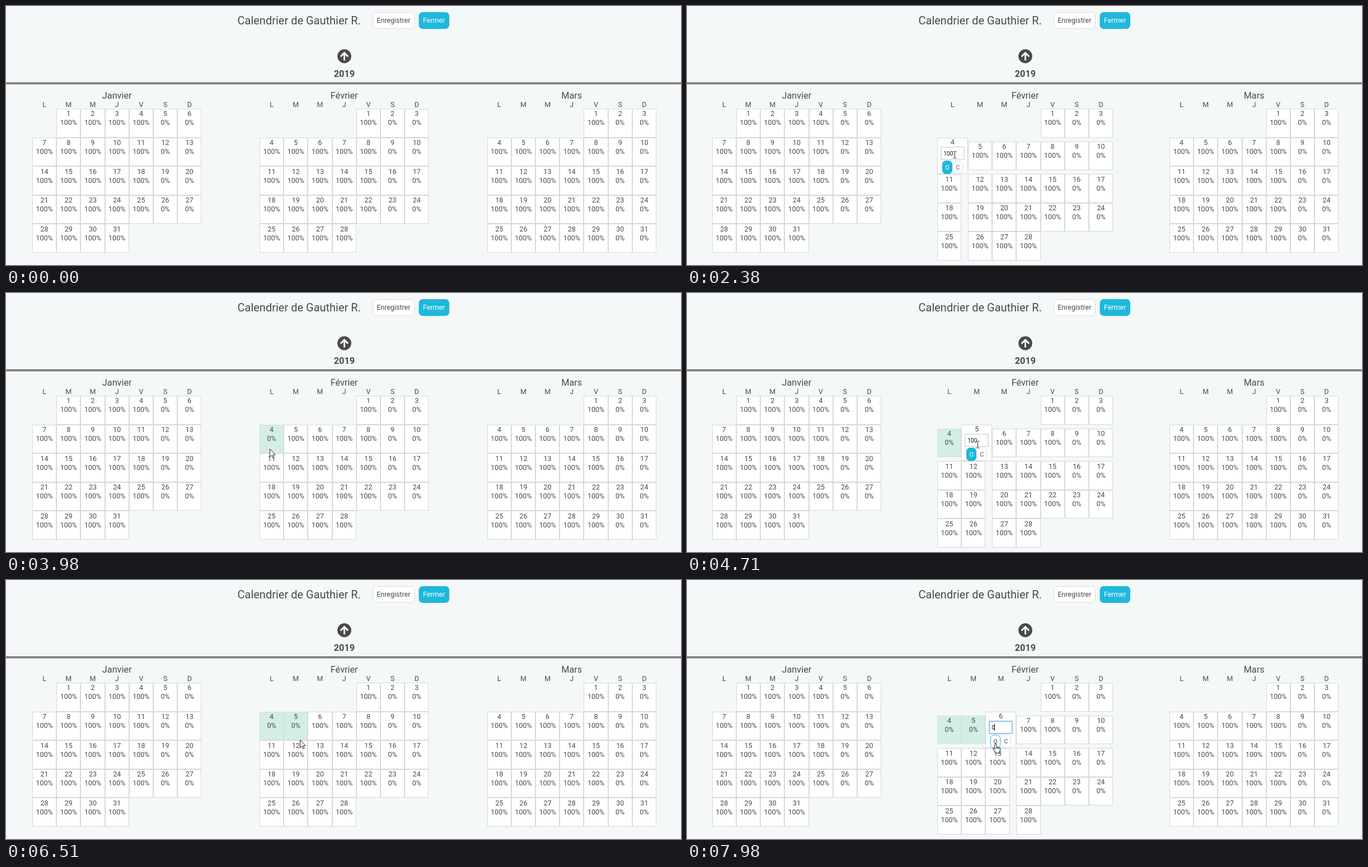
An HTML page for the animation above (8000 ms loop, 1206 by 464 pixels).

```html
<!DOCTYPE html>
<html lang="fr">
<head>
<meta charset="utf-8">
<title>Calendrier</title>
<style>
  html, body { margin: 0; width: 100%; height: 100%; overflow: hidden; background: #f4f8f9; }
  svg { display: block; font: 12.5px Roboto, sans-serif; fill: #4a4a4a; }
  .mid { text-anchor: middle; }
  .month { font-size: 16.25px; }
  .small { font-size: 10.4px; }
</style>
</head>
<body>
<svg id="stage" width="1206" height="464" viewBox="0 0 1206 464">
  <text x="413.5" y="33" font-size="20">Calendrier de Gauthier R.</text>
  <rect x="655.5" y="11.5" width="74" height="29" rx="6.5" fill="#fff" stroke="#d9dcdd"/>
  <text class="mid" x="692.3" y="30">Enregistrer</text>
  <rect x="737.5" y="11" width="54.5" height="30" rx="7" fill="#1fb8dc"/>
  <text class="mid" x="764.7" y="30" fill="#fff">Fermer</text>
  <circle cx="604.5" cy="90" r="12.4"/>
  <path d="M604.5 97.5V84.5M597.8 90.6l6.7-6.7 6.7 6.7" fill="none" stroke="#f4f8f9" stroke-width="3"/>
  <text class="mid month" x="604.4" y="127" font-weight="700">2019</text>
  <path d="M0 137.5H1206M0 139.5H1206" stroke="#1a1a1a"/>
  <g id="calendar"></g>
  <g id="pointer" stroke-linejoin="round"></g>
</svg>
<script>
const LOOP = 8000;
const CELL_W = 43.2, CELL_H = 51.6, TOP = 184;
const EXTRA_W = 11.7, EXTRA_H = 14;
const LINE = '#d6d8d9', BLUE = '#1fb8dc';
const FEB_LEFT = 453, EDIT_LEFT = 447;

const months = [
  { name: 'Janvier', left: 47, editLeft: 44.7, first: 1, days: 31 },
  { name: 'Février', left: FEB_LEFT, editLeft: EDIT_LEFT, first: 4, days: 28, editable: true },
  { name: 'Mars', left: 859.6, editLeft: 861.9, first: 4, days: 31 }
];

const edits = [
  { day: 4, open: 2310, focus: 2600, typed: 3020, close: 3870 },
  { day: 5, open: 4600, focus: 4760, typed: 4920, close: 5940 },
  { day: 6, open: 7030, focus: 7360, typed: 7450, close: LOOP }
];

// Pointer path: time, x, y
const path = [
  [750, 1074, 452], [1280, 642, 294.5], [1500, 642, 294.5], [2010, 464, 270], [2070, 478, 266],
  [3390, 478, 266], [3720, 471, 279], [4240, 471, 279], [4480, 519, 271],
  [5320, 519, 271], [5700, 511, 286], [6500, 511, 286], [6510, 525, 286], [6780, 559, 264],
  [7360, 559, 264], [7480, 559, 258], [7650, 559, 258], [7970, 551, 293]
];

const shapes = {
  arrow: '<path d="M0 0V14.2L3.3 11.2 5.5 16.2 7.6 15.3 5.4 10.4H9.8Z" fill="#fff" stroke="#222"/>',
  beam: '<path d="M-3-6H-1L0-5 1-6H3M0-5V5M-3 6H-1L0 5 1 6H3" fill="none" stroke="#222"/>',
  hand: '<path d="M-1.6 1.4a1.6 1.6 0 0 1 3.2 0V6q3.5 0 6.6 1.6V11L6.8 13.5V16.5H-.6V14.5L-4.8 9.3q0-2.2 1.8-1.2L-1.6 9.6Z" fill="#fff" stroke="#111"/>' +
        '<path d="M1.6 6V9M4 6.5V9M6.1 7V9" fill="none" stroke="#111" stroke-width=".9"/>'
};

const calendar = document.getElementById('calendar');
const pointer = document.getElementById('pointer');
const text = (x, y, s, cls = '', fill = '') =>
  `<text class="mid ${cls}" x="${x}" y="${Math.round(y)}"${fill && ` fill="${fill}"`}>${s}</text>`;

function box(x, y, w, h, fill = '#fff', stroke = LINE) {
  const x0 = Math.round(x), y0 = Math.round(y);
  return `<rect x="${x0 + .5}" y="${y0 + .5}" width="${Math.round(x + w) - x0 - 1}" ` +
    `height="${Math.round(y + h) - y0 - 1}" fill="${fill}" stroke="${stroke}"/>`;
}

function button(x, y, label, fill, stroke, color) {
  return `<rect x="${x + .5}" y="${y + .5}" width="17" height="23" rx="6" fill="${fill}" stroke="${stroke}"/>` +
    text(x + 9, y + 16, label, 'small', color);
}

function editor(x, y, edit) {
  const left = Math.round(x);
  const mix = (a, b) => Math.round(a + (b - a) * edit.glow);
  const border = `rgb(${mix(222, 150)},${mix(224, 194)},${mix(225, 240)})`;
  const caret = left + 11.5 + Math.round(edit.value.length * 5.6) - .5;
  return box(x, y, CELL_W + EXTRA_W, CELL_H + EXTRA_H) +
    text(x + (CELL_W + EXTRA_W) / 2, 248, edit.day) +
    `<rect x="${left + 7}" y="253" width="41" height="22" fill="#fff" stroke="${border}" stroke-width="2"/>` +
    `<text x="${left + 11.5}" y="268" font-size="10" fill="#111">${edit.value}</text>` +
    (edit.glow ? `<path d="M${caret - .5} 258V270" stroke="#111"/>` : '') +
    button(left + 9, 277, 'O', edit.hover ? '#fff' : BLUE, BLUE, edit.hover ? '' : '#fff') +
    button(left + 28, 277, 'C', '#fff', '#dcdfe0', '');
}

function drawMonth(month, edit, done) {
  const left = edit ? month.editLeft : month.left;
  const active = month.editable ? edit : null;
  const editCol = active ? active.day - 4 : 9;
  const colX = c => left + c * CELL_W + (c > editCol ? EXTRA_W : 0);
  const width = 7 * CELL_W + (active ? EXTRA_W : 0);
  let out = text(left + width / 2, 166, month.name, 'month');
  [...'LMMJVSD'].forEach((d, c) => {
    out += text(colX(c) + (CELL_W + (c === editCol ? EXTRA_W : 0)) / 2, 181, d);
  });
  for (let day = 1; day <= month.days; day++) {
    const slot = day + month.first - 1, c = slot % 7, row = Math.floor(slot / 7);
    const x = colX(c), mid = x + CELL_W / 2;
    let y = TOP + row * CELL_H;
    if (active && day === active.day) { out += editor(x, y, active); continue; }
    if (active && row) y += row === 1 ? EXTRA_H / 2 : EXTRA_H;
    const off = month.editable && done.includes(day);
    const baseline = Math.round(y + 13.4);
    out += off ? box(x, y, CELL_W, CELL_H, '#d4ede6', '#cfe3de') : box(x, y, CELL_W, CELL_H);
    out += text(mid, baseline, day) + text(mid, baseline + 16, off || c > 4 ? '0%' : '100%');
  }
  return out;
}

function pointerAt(t) {
  const i = path.findIndex(k => k[0] > t);
  if (i < 0) return path[path.length - 1].slice(1);
  if (!i) return null;
  const [t0, x0, y0] = path[i - 1], [t1, x1, y1] = path[i];
  const p = (t - t0) / (t1 - t0), e = p * p * (3 - 2 * p);
  return [x0 + (x1 - x0) * e, y0 + (y1 - y0) * e];
}

const within = (v, a, b) => v >= a && v <= b;

function pointerKind(x, y, edit) {
  if (edit) {
    const dx = x - EDIT_LEFT - (edit.day - 4) * CELL_W;
    if (within(dx, 9, 27) && within(y, 277, 301)) return 'hand';
    return within(dx, 6, 49) && within(y, 252, 276) ? 'beam' : 'arrow';
  }
  if (!within(x, FEB_LEFT, FEB_LEFT + 7 * CELL_W)) return 'arrow';
  const dx = Math.abs((x - FEB_LEFT) % CELL_W - CELL_W / 2), dy = (y - TOP) % CELL_H;
  const onText = dy < 18 ? dx < 7 && dy > 2 : dx < 15 && dy < 36;
  return onText ? 'beam' : 'arrow';
}

let shownCalendar = '', shownKind = '';

function render(t) {
  const current = edits.find(e => t >= e.open && t < e.close);
  const done = edits.filter(e => t >= e.close).map(e => e.day);
  const pos = pointerAt(t);
  const kind = pos ? pointerKind(...pos, current) : '';
  const edit = current && {
    day: current.day,
    value: t < current.typed ? '100' : '0',
    glow: Math.max(0, Math.min(1, (t - current.focus) / 150)),
    hover: kind === 'hand'
  };
  const key = JSON.stringify([edit, done]);
  if (key !== shownCalendar) {
    calendar.innerHTML = months.map(m => drawMonth(m, edit, done)).join('');
    shownCalendar = key;
  }
  if (kind !== shownKind) {
    pointer.innerHTML = shapes[kind] || '';
    shownKind = kind;
  }
  if (pos) pointer.setAttribute('transform', `translate(${Math.round(pos[0]) + .5} ${Math.round(pos[1]) + .5})`);
}

const start = performance.now();
function tick() {
  render((performance.now() - start) % LOOP);
  requestAnimationFrame(tick);
}
tick();
</script>
</body>
</html>
```
